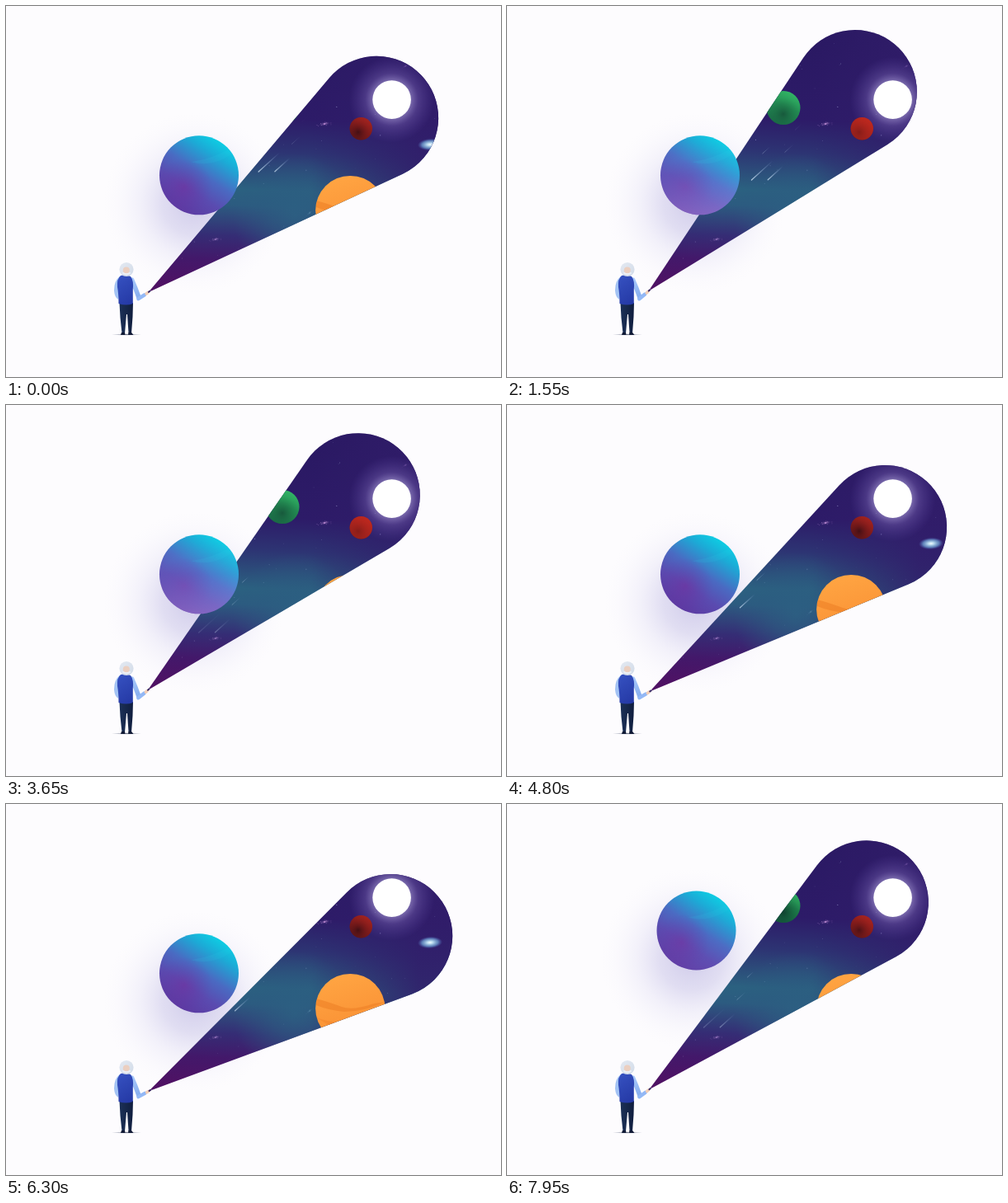
Animation of 600 by 450 pixels, one loop 8 s. Source, as an HTML page with a canvas:

```html
<!DOCTYPE html>
<html lang="en">
<head>
<meta charset="utf-8">
<title>Flashlight universe</title>
<style>
  html, body { margin: 0; width: 100%; height: 100%; overflow: hidden; background: #fdfcfe; }
  canvas { display: block; width: 100vw; height: 100vh; }
</style>
</head>
<body>
<canvas id="stage"></canvas>
<script>
const W = 600, H = 450, LOOP = 8000;
const canvas = document.getElementById('stage');
const ratio = window.devicePixelRatio || 1;
canvas.width = W * ratio;
canvas.height = H * ratio;
const ctx = canvas.getContext('2d');

const ELBOW = { x: 161, y: 356 };
const REACH = 362.7, LAMP = 18, BEAM_R = 75;

// Beam elevation in degrees: [time, angle]
const SWING = [
  [0, 37.4], [780, 36.6], [1550, 44], [1700, 45.2], [2580, 48.8], [2650, 48.65],
  [3200, 48.2], [3400, 47], [3650, 42.9], [4250, 37.2], [4800, 35], [5100, 33.9],
  [5950, 32.6], [6300, 32.7], [6800, 37.3], [7650, 40.2], [8000, 40.75]
];

const clamp = (v, lo = 0, hi = 1) => Math.min(hi, Math.max(lo, v));
const smooth = v => { v = clamp(v); return v * v * (3 - 2 * v); };

function slope(keys, i) {
  if (i === 0 || i === keys.length - 1) return 0;
  const rate = k => (keys[k + 1][1] - keys[k][1]) / (keys[k + 1][0] - keys[k][0]);
  const a = rate(i - 1), b = rate(i);
  return a * b <= 0 ? 0 : 2 * a * b / (a + b);
}

// Monotone cubic interpolation between keys
function sample(keys, t) {
  let i = 0;
  while (i < keys.length - 2 && t > keys[i + 1][0]) i++;
  const [t0, v0] = keys[i], [t1, v1] = keys[i + 1];
  const d = t1 - t0, u = (t - t0) / d, w = 1 - u;
  return v0 * (1 + 2 * u) * w * w + slope(keys, i) * d * u * w * w
    + v1 * u * u * (3 - 2 * u) - slope(keys, i + 1) * d * u * u * w;
}

function addStops(gradient, stops) {
  for (const [at, color] of stops) gradient.addColorStop(at, color);
  return gradient;
}
const linear = (x0, y0, x1, y1, ...stops) => addStops(ctx.createLinearGradient(x0, y0, x1, y1), stops);
const radial = (x, y, r, ...stops) => addStops(ctx.createRadialGradient(x, y, 0, x, y, r), stops);

function disc(x, y, r, fill) {
  ctx.fillStyle = fill;
  ctx.beginPath();
  ctx.arc(x, y, r, 0, 7);
  ctx.fill();
}

function shape(path, fill) {
  ctx.fillStyle = fill;
  ctx.fill(new Path2D(path));
}

function stroke(path, color, width) {
  ctx.strokeStyle = color;
  ctx.lineWidth = width;
  ctx.stroke(new Path2D(path));
}

function placed(x, y, angle, draw) {
  ctx.save();
  ctx.translate(x, y);
  ctx.rotate(angle);
  draw();
  ctx.restore();
}

function clipDisc(x, y, r) {
  ctx.beginPath();
  ctx.arc(x, y, r, 0, 7);
  ctx.clip();
}

function randomizer(seed) {
  return () => (seed = (seed * 16807) % 2147483647) / 2147483647;
}

const random = randomizer(4177);
const stars = Array.from({ length: 75 }, () => ({
  x: 190 + random() * 350, y: 10 + random() * 310,
  r: 0.25 + random() * 0.4, alpha: 0.12 + random() * 0.45
}));
const dust = Array.from({ length: 30 }, () => {
  const spread = random() * random();
  const a = random() * Math.PI * 2;
  return { x: Math.cos(a) * spread * 17, y: Math.sin(a) * spread * 4, alpha: 0.3 + random() * 0.4 };
});

function galaxy(x, y, angle, size, tint, alpha) {
  placed(x, y, angle, () => {
    ctx.scale(size, size);
    for (const p of dust) disc(p.x, p.y, 0.45, `rgba(${tint},${p.alpha * alpha})`);
    ctx.scale(1, 0.35);
    disc(0, 0, 7, radial(0, 0, 7, [0, `rgba(${tint},${alpha * 0.4})`], [1, `rgba(${tint},0)`]));
  });
}

function meteors(t) {
  // [sideways offset, lag, length]
  const lanes = [[0, 0, 34], [10, 0.07, 24], [-9, 0.16, 12], [4, 0.26, 14], [-3, 0.4, 10]];
  for (const [offset, lag, length] of lanes) {
    const u = (t / 1450 + 1.42 - lag) % 1;
    const alpha = Math.sin(Math.PI * u) * (length > 20 ? 0.75 : 0.45);
    const x = 365 - 140 * u + offset, y = 140 + 145 * u + offset;
    const tx = x + length * 0.75, ty = y - length * 0.68;
    const fill = linear(x, y, tx, ty, [0, `rgba(220,240,255,${alpha})`], [1, 'rgba(150,180,230,0)']);
    stroke(`M${x} ${y}L${tx} ${ty}`, fill, length > 20 ? 1.3 : 0.8);
  }
}

function beamPath(angle) {
  const cx = ELBOW.x + REACH * Math.cos(angle), cy = ELBOW.y - REACH * Math.sin(angle);
  const ax = ELBOW.x + LAMP * Math.cos(angle), ay = ELBOW.y - LAMP * Math.sin(angle);
  const half = 0.8;
  const lean = Math.asin((BEAM_R - half) / (REACH - LAMP));
  const nx = Math.sin(angle) * half, ny = Math.cos(angle) * half;
  ctx.beginPath();
  ctx.moveTo(ax - nx, ay - ny);
  ctx.arc(cx, cy, BEAM_R, -angle - lean - Math.PI / 2, -angle + lean + Math.PI / 2);
  ctx.lineTo(ax + nx, ay + ny);
  ctx.closePath();
}

function universe(angle, glare, t) {
  ctx.save();
  beamPath(angle);
  ctx.fillStyle = linear(350, 10, 335, 345,
    [0, '#291861'], [0.38, '#2d1b68'], [0.5, '#2d3473'], [0.64, '#2b6180'],
    [0.7, '#2c5b80'], [0.81, '#352d75'], [0.9, '#43186a'], [1, '#4f1264']);
  ctx.fill();
  ctx.clip();

  disc(350, 254, 75, radial(350, 254, 75, [0, 'rgba(44,96,130,.85)'], [0.4, 'rgba(44,93,129,.6)'], [1, 'rgba(44,90,128,0)']));
  ctx.fillStyle = linear(370, 0, 500, 0, [0, 'rgba(49,29,106,0)'], [1, 'rgba(49,29,106,.85)']);
  ctx.fillRect(370, 0, 230, 300);

  for (const s of stars) disc(s.x, s.y, s.r, `rgba(210,220,255,${s.alpha})`);
  galaxy(386, 143, -0.2, 1, '215,160,230', 0.8);
  galaxy(254, 283, -0.2, 0.8, '195,150,220', 0.75);
  galaxy(484, 73, -0.5, 0.5, '190,140,220', 0.5);
  galaxy(368, 251, -0.7, 0.6, '150,190,220', 0.35);
  placed(514, 168, -0.06, () => {
    ctx.scale(1, 0.48);
    disc(0, 0, 15, radial(0, 0, 15, [0, '#f4fbff'], [0.25, '#b4d6ec'], [0.65, 'rgba(110,160,210,.75)'], [1, 'rgba(80,110,190,0)']));
  });
  meteors(t);

  disc(467.6, 113.6, 52, radial(467.6, 113.6, 52, [0.4, 'rgba(205,195,245,.55)'], [0.62, 'rgba(160,140,220,.25)'], [1, 'rgba(120,100,200,0)']));
  disc(467.6, 113.6, 23.3, '#fff');

  disc(430.3, 148.8, 13.7, linear(438, 136, 423, 161, [0, '#a3231f'], [0.5, '#76191b'], [1, '#4d1219']));
  disc(430.3, 148.8, 13.7, radial(427, 153, 15, [0, 'rgba(48,12,18,.65)'], [1, 'rgba(170,35,28,.2)']));
  disc(430.3, 148.8, 13.7, `rgba(228,48,32,${0.42 * glare})`);

  disc(335, 123.5, 20.5, linear(344, 105, 327, 143, [0, '#2fae60'], [0.45, '#1c7a49'], [1, '#12533b']));
  disc(335, 123.5, 20.5, radial(335, 131, 20, [0, 'rgba(10,40,36,.7)'], [1, 'rgba(20,90,55,0)']));
  disc(335, 123.5, 20.5, `rgba(60,205,120,${0.2 * glare})`);

  disc(417.3, 248.1, 42.2, linear(405, 208, 430, 290, [0, '#ffa442'], [1, '#f88c31']));
  ctx.save();
  clipDisc(417.3, 248.1, 42.2);
  shape('M376 236 Q394 241 407 246 T446 242 L460 240 Q434 252 410 252 Q390 250 376 244Z', 'rgba(235,125,35,.5)');
  shape('M374 258 Q402 270 430 261 T462 257 V263 Q431 268 403 275Z', 'rgba(235,125,35,.35)');
  ctx.restore();
  ctx.restore();
}

function planetGlow(x, y) {
  disc(x - 6, y + 34, 110, radial(x - 6, y + 34, 110,
    [0, 'rgba(126,116,198,.36)'], [0.35, 'rgba(140,131,206,.25)'],
    [0.6, 'rgba(165,158,220,.12)'], [0.85, 'rgba(200,195,235,.04)'], [1, 'rgba(220,215,240,0)']));
}

function planet(x, y, glare) {
  placed(x, y, 0, () => {
    disc(0, 0, 48, linear(30, -40, -24, 42,
      [0, '#0cd0e4'], [0.2, '#1caad6'], [0.48, '#4a6ac2'], [0.72, '#5a4bb0'], [1, '#5c3aa2']));
    disc(0, 0, 48, radial(-18, 14, 34, [0, 'rgba(125,36,150,.42)'], [1, 'rgba(105,45,160,0)']));
    ctx.save();
    clipDisc(0, 0, 48);
    shape('M-10 -16 Q20 -20 47 -38 V-31 Q18 -8 -10 -16Z', 'rgba(40,205,228,.12)');
    ctx.restore();
    disc(0, 0, 48, linear(0, -48, 0, 48, [0, 'rgba(130,190,240,0)'], [0.5, `rgba(130,155,240,${glare * 0.15})`], [1, `rgba(180,145,225,${glare * 0.45})`]));
  });
}

function man(angle) {
  placed(146, 398.5, 0, () => {
    ctx.scale(1, 0.07);
    disc(0, 0, 18, radial(0, 0, 18, [0, 'rgba(45,55,80,.7)'], [1, 'rgba(90,100,130,0)']));
  });
  shape('M137.5 360 H154 L153.5 377 L152 397 H148.6 L147 374 L146 374 L144 397 H140.5 L138.5 378Z',
    linear(137, 0, 155, 0, [0, '#1c3158'], [1, '#101d3d']));
  shape('M140 396 H144 L144.5 399 H139Z M148.5 396 H152 L154.5 399 H148Z', '#111a35');

  shape('M138 328 Q131 333 131 345 Q131.5 353 136 356 L139 334Z', '#a3c3f4');
  stroke('M152.5 332 Q157 342 161 353.5', linear(152, 330, 162, 355, [0, '#a9cafb'], [1, '#84abed']), 5.5);
  shape('M139 327 Q146 325 151 328 Q155 333 153.8 344 L153.8 361 Q146 364 136.5 361 Q136.5 349 135 341 Q134 331 139 327Z',
    linear(135, 330, 156, 360, [0, '#3550bf'], [1, '#2438a4']));

  placed(ELBOW.x, ELBOW.y, -angle, () => {
    stroke('M0 -1 L9 -.3', '#93b8f5', 4.4);
    stroke('M11.5 0 L13.5 0', '#f2cdb5', 3.6);
    stroke('M15 0 L17 0', '#3a2a66', 2);
  });

  disc(146, 319.5, 8.6, linear(139, 312, 153, 328, [0, '#e2e8f1'], [1, '#d3dce9']));
  disc(145.8, 320.5, 4, '#ebcfc0');
  stroke('M142 324 Q146 326.5 150 324', '#eef2f8', 2);
}

function render(t) {
  const degrees = sample(SWING, t);
  const angle = degrees * Math.PI / 180;
  const glare = smooth((degrees - 40) / 3);
  const lift = smooth((t - 6700) / 1300);
  const x = 234 - 4.5 * lift, y = 205.3 - 52 * lift;
  ctx.setTransform(ratio, 0, 0, ratio, 0, 0);
  ctx.lineCap = ctx.lineJoin = 'round';
  ctx.fillStyle = '#fdfcfe';
  ctx.fillRect(0, 0, W, H);
  planetGlow(x, y);
  universe(angle, glare, t);
  planet(x, y, glare);
  man(angle);
}

const start = performance.now();
function frame(now) {
  render(Math.max(0, now - start) % LOOP);
  requestAnimationFrame(frame);
}
render(0);
requestAnimationFrame(frame);
</script>
</body>
</html>
```
